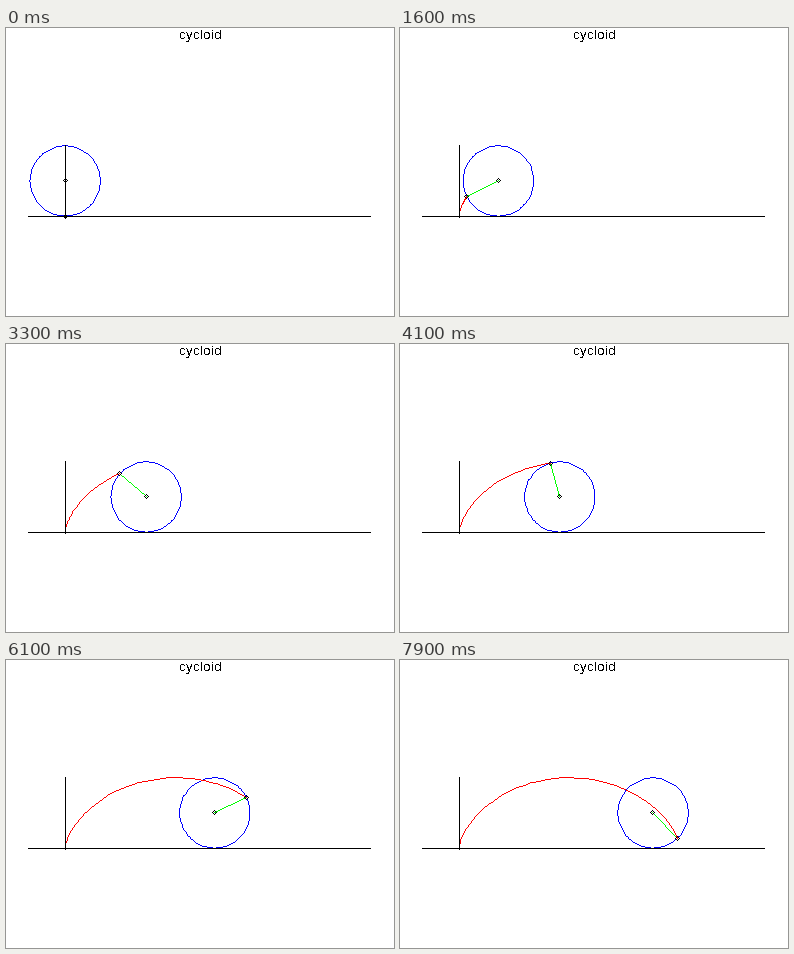
A matplotlib script that plays this animation: 388x288 px, repeating every 8 s.

```python
import numpy as np
import matplotlib.pyplot as plt
from matplotlib.animation import FuncAnimation

W, H, DPI = 388, 288, 100
FRAMES, INTERVAL = 80, 100
STEP = np.radians(4)                # roll per frame
R = 35.155                          # wheel radius
X0, CY = 59.095, 152.9              # wheel centre at the start
BLACK, BLUE = (0, 0, 0), (0, 0, 255)
GREEN, RED = (0, 255, 0), (255, 0, 0)

TURN = np.linspace(0, 2 * np.pi, 101)
DIAMOND = np.array([[0, -2], [2, 0], [0, 2], [-2, 0], [0, -2]])

# Whole-pixel glyph stems and advances
plt.rcParams["text.hinting"] = "force_autohint"
plt.rcParams["text.hinting_factor"] = 1

fig = plt.figure(figsize=(W / DPI, H / DPI), dpi=DPI, facecolor="white")
ax = fig.add_axes([0, 0, 1, 1])
ax.axis("off")
canvas = np.full((H, W, 3), 255, np.uint8)
image = ax.imshow(canvas, extent=(0, W, H, 0), aspect="auto",
                  interpolation="nearest")
title = ax.text(173, 11, "cycloid", family="Liberation Sans",
                size=13.33 * 72 / DPI, ha="left", va="baseline")
title.set_antialiased(False)


def stroke(color, xs, ys):
    """Draw a one-pixel polyline without smoothing."""
    pts = np.floor(np.column_stack([xs, ys])).astype(int)
    for a, b in zip(pts[:-1], pts[1:]):
        n = max(abs(b - a).max(), 1)
        t = np.arange(n + 1)[:, None] / n
        x, y = np.floor(a + (b - a) * t + 0.5).astype(int).T
        canvas[y, x] = color


def mark(x, y):
    stroke(BLACK, *(DIAMOND + np.floor([x, y])).T)


def cycloid(a):
    return X0 + R * (a - np.sin(a)), CY + R * np.cos(a)


def update(i):
    a = i * STEP
    cx = X0 + R * a
    px, py = cycloid(a)
    canvas[:] = 255
    stroke(BLUE, cx + R * np.cos(TURN), CY + R * np.sin(TURN))
    stroke(GREEN, [cx, px], [CY, py])
    stroke(RED, *cycloid(np.linspace(0, a, 50)))
    stroke(BLACK, [22, 364], [188, 188])
    stroke(BLACK, [59, 59], [117, 189])
    mark(cx, CY)
    mark(px, py)
    image.set_data(canvas)
    return image, title


anim = FuncAnimation(fig, update, frames=FRAMES, interval=INTERVAL,
                     repeat=True, repeat_delay=0)
plt.show()
```
